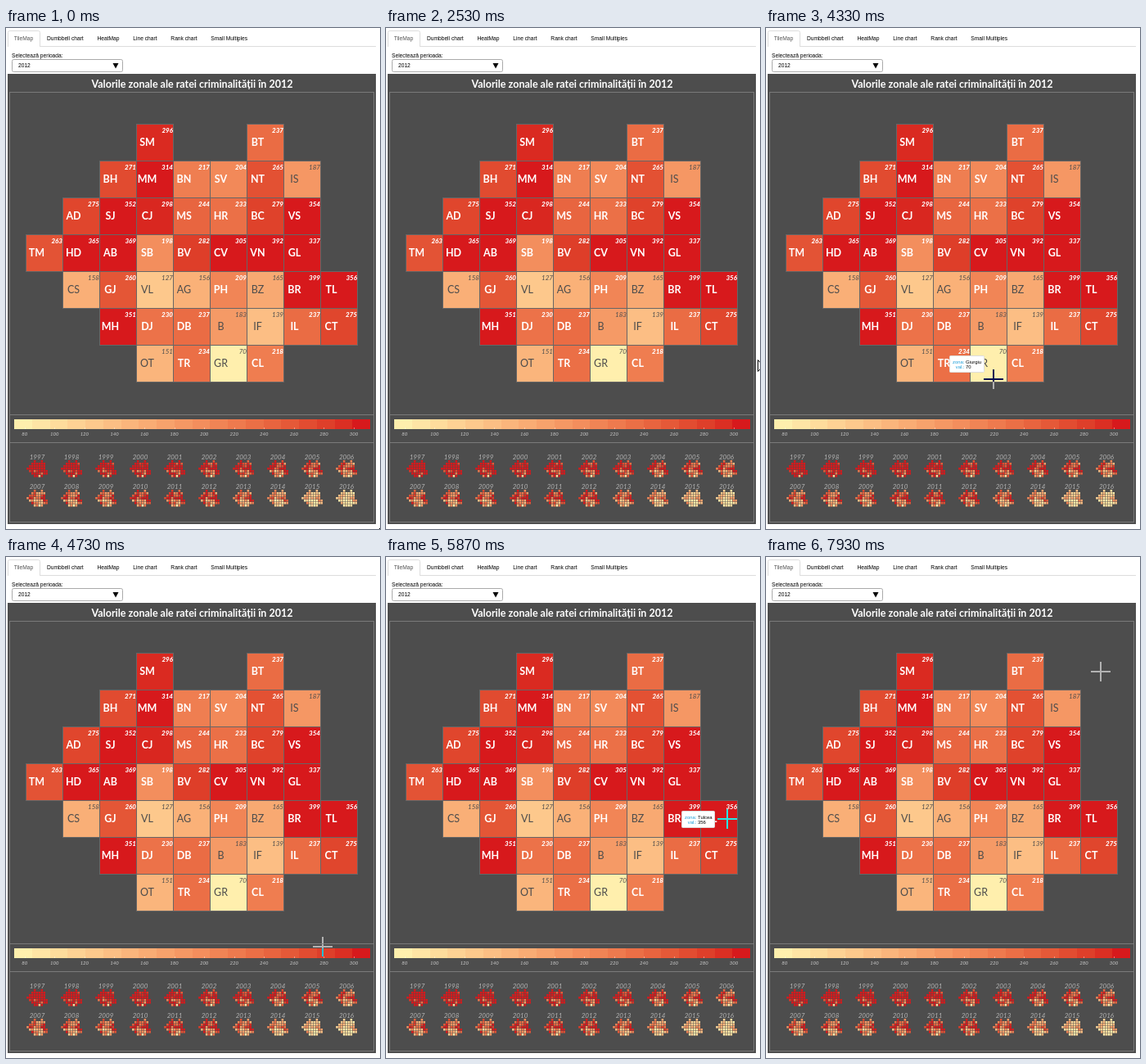
Animation of 457 by 612 pixels, one loop 8000 ms. Source, as an HTML page with a canvas:

```html
<!DOCTYPE html>
<html lang="ro">
<head>
<meta charset="utf-8">
<title>TileMap</title>
<style>
  html, body { margin: 0; width: 100%; height: 100%; overflow: hidden; background: #fff; }
  canvas { display: block; }
</style>
</head>
<body>
<canvas id="stage" width="457" height="612"></canvas>
<script>
const W = 457, H = 612, LOOP = 8000, STEP = 1000 / 15;
const SANS = '"Liberation Sans", Arial, sans-serif';
const LATO = 'Lato, sans-serif';
const PANEL = '#4d4d4d', RULE = '#7a7a7a';
const TILE = 45, MAP_X = 25, MAP_Y = 118;
const LOW = 79, HIGH = 305;

// Each row: first column, then code and value; "-" leaves a gap.
const ROWS = [
  '3 SM296 - - BT237',
  '2 BH271 MM314 BN217 SV204 NT265 IS187',
  '1 AD275 SJ352 CJ298 MS244 HR233 BC279 VS354',
  '0 TM263 HD365 AB369 SB198 BV282 CV305 VN392 GL337',
  '1 CS158 GJ260 VL127 AG156 PH209 BZ165 BR399 TL356',
  '2 MH351 DJ230 DB237 B183 IF139 IL237 CT275',
  '3 OT151 TR234 GR70 CL218'
];
const NAMES = { GR: 'Giurgiu', TL: 'Tulcea', BR: 'Braila', CL: 'Calarasi', CT: 'Constanta', GL: 'Galati' };

const tiles = ROWS.flatMap((line, row) => {
  const [first, ...cells] = line.split(' ');
  return cells.map((cell, i) => ({
    code: cell.replace(/\d+/, ''), value: +cell.replace(/\D+/, ''), col: +first + i, row
  })).filter(tile => tile.code !== '-');
});

const clamp01 = v => Math.min(1, Math.max(0, v));
const mix = (a, b, k) => a + (b - a) * k;

// Cream to red, blended in Lab: the cube roots of X, Y and Z change linearly.
function heat(value) {
  const k = clamp01((value - LOW) / (HIGH - LOW));
  const x = 0.9505 * mix(0.9427, 0.6698, k) ** 3;
  const y = mix(0.9509, 0.5338, k) ** 3;
  const z = 1.089 * mix(0.7809, 0.2852, k) ** 3;
  const linear = [
    3.2406 * x - 1.5372 * y - 0.4986 * z,
    -0.9689 * x + 1.8758 * y + 0.0415 * z,
    0.0557 * x - 0.204 * y + 1.057 * z
  ];
  return `rgb(${linear.map(c => Math.round(255 * (1.055 * clamp01(c) ** (1 / 2.4) - 0.055)))})`;
}

function write(g, str, x, y, font, color, align = 'left') {
  g.font = font;
  g.fillStyle = color;
  g.textAlign = align;
  g.fillText(str, x, y);
}
function box(g, x, y, w, h, r, fill, stroke) {
  g.beginPath();
  g.roundRect(x, y, w, h, r);
  g.fillStyle = fill;
  g.fill();
  g.strokeStyle = stroke;
  g.lineWidth = 1;
  g.stroke();
}
function polygon(g, points, fill) {
  g.beginPath();
  points.forEach(([x, y]) => g.lineTo(x, y));
  g.closePath();
  g.fillStyle = fill;
  g.fill();
}

function drawControls(g) {
  const font = `6.67px ${SANS}`;
  g.fillStyle = '#ddd';
  g.fillRect(2, 22, 450, 1);
  box(g, 2.5, 3.5, 39, 19, [2, 2, 0, 0], '#fff', '#ddd');
  g.fillStyle = '#fff';
  g.fillRect(3, 22, 38, 1);
  let x = 9.7;
  ['TileMap', 'Dumbbell chart', 'HeatMap', 'Line chart', 'Rank chart', 'Small Multiples'].forEach((label, i) => {
    write(g, label, x, 15, font, i ? '#000' : '#555');
    x += g.measureText(label).width + 16.8;
  });
  write(g, 'Selectează perioada:', 7, 36, font, '#000');
  box(g, 7.5, 38.5, 135, 15, 2, '#fff', '#aaa');
  write(g, '2012', 15, 48, font, '#000');
  polygon(g, [[130.5, 43], [137.5, 43], [134, 49.5]], '#000');
}

function drawPanel(g) {
  g.fillStyle = PANEL;
  g.fillRect(2, 56, 450, 550);
  g.strokeStyle = RULE;
  g.lineWidth = 1;
  [[78.5, 394], [472.5, 34], [506.5, 97]].forEach(([y, h]) => g.strokeRect(4.5, y, 445, h));
  write(g, 'Valorile zonale ale ratei criminalității în 2012', 227.5, 73, `bold 12.5px ${LATO}`, '#fff', 'center');
}

function drawTiles(g) {
  for (const { code, value, col, row } of tiles) {
    const x = MAP_X + col * TILE, y = MAP_Y + row * TILE;
    const light = value > 190, color = light ? '#fff' : PANEL;
    g.fillStyle = heat(value);
    g.fillRect(x, y, TILE, TILE);
    g.strokeStyle = '#666';
    g.lineWidth = 1;
    g.strokeRect(x - 0.5, y - 0.5, TILE, TILE);
    write(g, code, x + 12.5, y + 26, `${light ? 'bold' : 400} 12.5px ${LATO}`, color, 'center');
    write(g, value, x + 44, y + 10, `italic ${light ? 800 : 400} 8px ${LATO}`, color, 'right');
  }
}

function drawLegend(g) {
  const left = 10, width = 435, bins = 20, bin = width / bins;
  for (let i = 0; i < bins; i++) {
    g.fillStyle = heat(mix(LOW, HIGH, i / (bins - 1)));
    const x = Math.round(left + i * bin);
    g.fillRect(x, 478, Math.round(left + (i + 1) * bin) - x, 12);
  }
  for (let v = 80; v <= 300; v += 20) {
    const x = left + bin * (0.5 + (v - LOW) / (HIGH - LOW) * (bins - 1));
    g.fillStyle = 'rgba(255,255,255,.4)';
    g.fillRect(Math.round(x), 488, 1, 2);
    write(g, v, x, 498, `italic 6px ${LATO}`, '#ccc', 'center');
  }
}

// The rate falls over the years, with a second rise near 2011.
function drawMultiples(g) {
  let seed = 7;
  const random = () => (seed = seed * 16807 % 2147483647) / 2147483647;
  for (let i = 0; i < 20; i++) {
    const level = 1.8 * Math.exp(-0.075 * i) + 0.45 * Math.exp(-(((i - 14.5) / 2.5) ** 2));
    const cx = 38 + i % 10 * 42, top = i < 10 ? 528 : 564;
    write(g, 1997 + i, cx, top - 1.3, `italic 8px ${LATO}`, '#b3b3b3', 'center');
    for (const { value, col, row } of tiles) {
      g.fillStyle = heat(value * level * mix(0.85, 1.15, random()));
      g.fillRect(cx - 12.8 + col * 2.9, top + row * 3, 2.5, 2.6);
    }
  }
}

const backdrop = document.createElement('canvas');
backdrop.width = W;
backdrop.height = H;
const back = backdrop.getContext('2d');
back.fillStyle = '#fff';
back.fillRect(0, 0, W, H);
[drawControls, drawPanel, drawTiles, drawLegend, drawMultiples].forEach(draw => draw(back));

// Pointer moves as cubic paths; the pointer rests between them.
const smooth = s => s * s * (3 - 2 * s);
const steady = s => s;
const MOVES = [
  { start: 2533, end: 3400, ease: smooth, path: [[454, 406], [440, 474], [300, 474], [280, 416]] },
  { start: 4200, end: 5067, ease: smooth, path: [[279, 416], [262, 488], [420, 526], [443, 402]] },
  { start: 5067, end: 5867, ease: steady, path: [[443, 402], [441, 320], [430, 320], [417, 320]] },
  { start: 5933, end: 6533, ease: smooth, path: [[417, 320], [405, 325], [380, 326], [364, 320]] },
  { start: 7067, end: 7933, ease: smooth, path: [[363, 321], [405, 300], [450, 190], [409, 140]] }
];
function pointerAt(t) {
  const move = MOVES.filter(m => t >= m.start - 1).pop();
  if (!move) return null;
  const s = move.ease(clamp01((t - move.start) / (move.end - move.start))), r = 1 - s;
  const [a, b, c, d] = move.path;
  return [0, 1].map(k => Math.round(
    r ** 3 * a[k] + 3 * r * r * s * b[k] + 3 * r * s * s * c[k] + s ** 3 * d[k]));
}

const g = document.getElementById('stage').getContext('2d');

function drawTooltip({ code, value, col, row }) {
  const font = `5.9px ${SANS}`, name = NAMES[code] || code;
  g.font = font;
  const w = Math.round(24 + g.measureText(name).width);
  const left = Math.floor(MAP_X + (col + 0.5) * TILE - 5) - w, cy = MAP_Y + (row + 0.5) * TILE;
  box(g, left + 0.5, cy - 10, w - 1, 20, 1, '#fff', '#ddd');
  [['zona:', name, -1], ['val.:', value, 5.8]].forEach(([label, text, dy]) => {
    write(g, label, left + 18.5, cy + dy, font, '#1a9cd8', 'right');
    write(g, text, left + 20, cy + dy, font, '#000');
  });
}

function drawArrow(x, y) {
  const shape = [[0, 0], [0, 14], [3, 11], [5, 16], [7, 15], [5, 10], [9, 10]];
  polygon(g, shape.map(([dx, dy]) => [x + 0.5 + dx, y - 0.5 + dy]), '#fff');
  g.strokeStyle = '#000';
  g.lineWidth = 1;
  g.stroke();
}

// The crosshair inverts whatever lies below it.
function drawCross(x, y) {
  g.globalCompositeOperation = 'difference';
  g.fillStyle = '#fff';
  g.beginPath();
  g.rect(x - 12, y - 1, 24, 2);
  g.rect(x - 1, y - 12, 2, 24);
  g.fill();
  g.globalCompositeOperation = 'source-over';
}

function render(now) {
  const ms = now % LOOP;
  const t = Math.floor((ms + 4) / STEP) * STEP;
  g.drawImage(backdrop, 0, 0);
  if (ms < 930) {
    g.fillStyle = '#000';
    g.fillRect(456, 611, 1, 1);
  }
  const pointer = pointerAt(t);
  if (!pointer) return;
  const [x, y] = pointer;
  const col = Math.floor((x - MAP_X) / TILE), row = Math.floor((y - MAP_Y) / TILE);
  const hovered = tiles.find(tile => tile.col === col && tile.row === row);
  if (hovered) drawTooltip(hovered);
  (x < 452 ? drawCross : drawArrow)(x, y);
}

const origin = performance.now();
function tick() {
  render(performance.now() - origin);
  requestAnimationFrame(tick);
}
tick();
</script>
</body>
</html>
```
